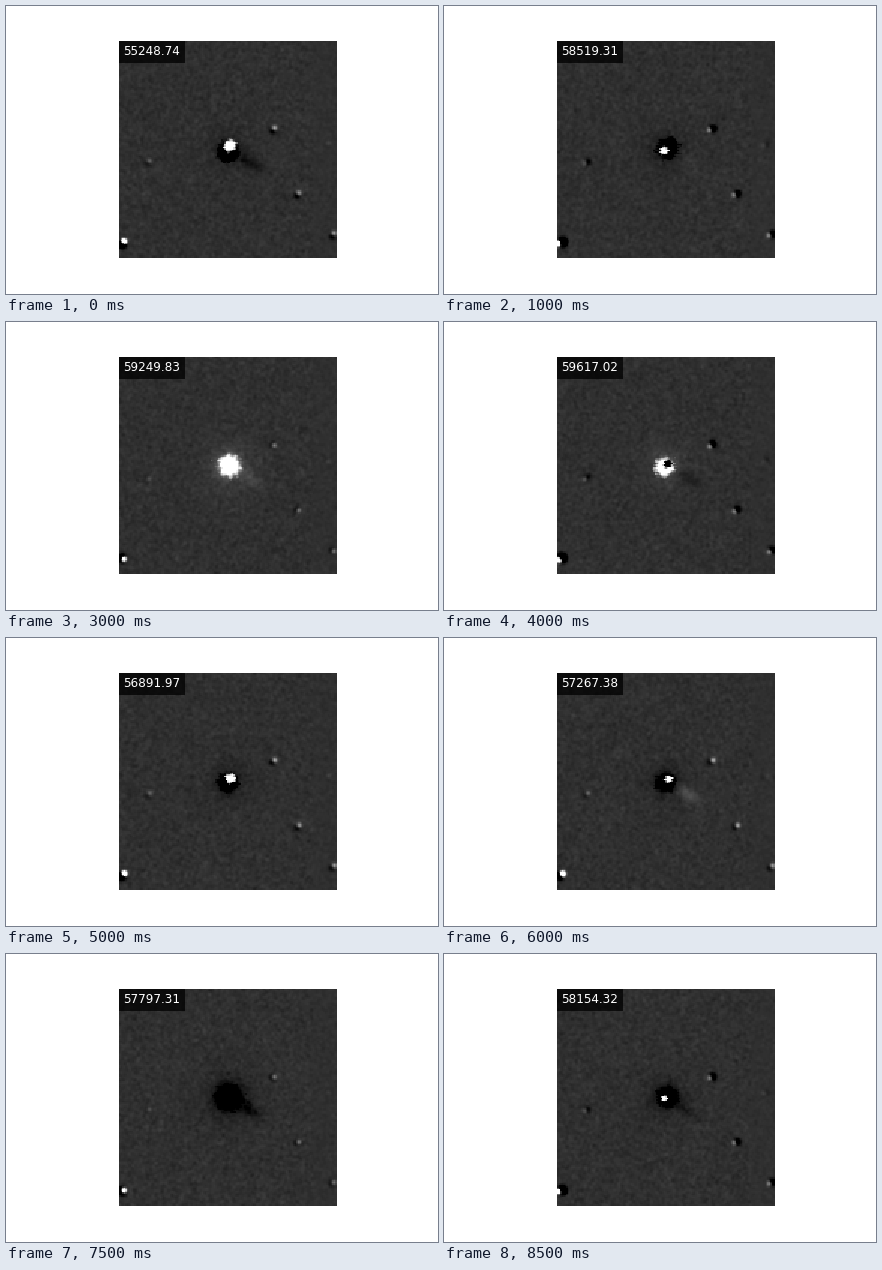
A matplotlib script for the animation above (9000 ms loop, 432x288 px).

```python
import numpy as np
import matplotlib.pyplot as plt
from matplotlib.animation import FuncAnimation
from matplotlib.patches import Rectangle

W, H, DPI = 432, 288, 72
LEFT, RIGHT, TOP, BOTTOM = 112.68, 330.12, 34.56, 252
N = 145
SKY = 0.187
FRAMES = 18

# key points along the light curve, in order of epoch
EPOCH = [0, 4, 7, 9, 13, 15, 17]
MJD = [55248.74, 57267.38, 57797.31, 58154.32, 58884.29, 59249.83, 59617.02]
WHITE = [6, 4, 0, 3, 5.5, 10.5, 9]      # radius of the bright core
BLACK = [10, 9.5, 12.5, 10, 9, 0, 4]    # radius of the dark core
SHIFT_X = [1.2, 2, .8, -2, -3, .8, -2]  # misalignment of the two images
SHIFT_Y = [-3, -2, -.5, 1, 1.5, .5, 2]
TAIL = [-.13, .13, -.12, -.06, .12, .08, -.08]

# x, y, gain of the field stars
STARS = [(267, 123.5, 1), (291.5, 188.5, .9), (326.5, 229, .9),
         (142, 156.5, .4), (321, 139, .15), (116.5, 237, 5)]

step = (RIGHT - LEFT) / N
X, Y = np.meshgrid(LEFT + (np.arange(N) + .5) * step,
                   TOP + (np.arange(N) + .5) * step)


def smooth_noise(rng):
    a = rng.normal(size=(N, N))
    for axis in (0, 1):
        a = (np.roll(a, 1, axis) + 2 * a + np.roll(a, -1, axis)) / 4
    return a / a.std()


def spot(x, y, r, power=2):
    return np.exp(-(np.hypot(X - x, Y - y) / r) ** power)


def stars(dx, dy):
    field = 0
    for x, y, gain in STARS:
        light = .6 * spot(x + .7 * dx, y + .4 * dy, 2.6)
        dark = (.4 - .08 * dx) * spot(x - .5 * dx, y - .4 * dy, 3.4)
        field = field + gain * (light - dark)
    return field


def tail(level):
    along = (X - 243) * .8 + (Y - 156) * .6
    across = (Y - 156) * .8 - (X - 243) * .6
    return level * np.exp(-(along / 13) ** 2 - (across / 6) ** 2)


def add_core(field, white, black, dx, dy, ragged):
    # the smaller disc lies on top; misaligned rows comb its edge
    discs = [(white, 1.2, 1), (black, -.3, -.6)]
    comb = .5 * dx * np.sin(2.1 * Y)
    for r, level, side in sorted(discs, reverse=True):
        dist = np.hypot(X - 222 - side * dx + comb, Y - 143.5 - side * dy)
        mask = np.exp(-(dist * ragged / max(r, .01)) ** 6)
        field = field * (1 - mask) + level * mask
    return field


def epoch_of(i):
    # the loop shows the first epoch, then enters the sequence halfway
    return 0 if i == 0 else 1 + (i + 8) % 17


def mjd(epoch):
    # the survey paused for four years after the first epoch
    return np.interp(epoch, [0, 1] + EPOCH[1:], [MJD[0], 56704.27] + MJD[1:])


def picture(i):
    rng = np.random.default_rng(40 + i)
    white, black, dx, dy, glow = (
        np.interp(epoch_of(i), EPOCH, row)
        for row in (WHITE, BLACK, SHIFT_X, SHIFT_Y, TAIL))
    calm = np.where(X > 306, .6, 1)
    field = SKY + .015 * smooth_noise(rng) * calm
    ragged = 1 + .1 * smooth_noise(rng)
    halo = .05 * (white - black) * spot(222, 144, 8, 1)
    field = field + halo * ragged ** 2 + tail(glow) * ragged + stars(dx, dy)
    return np.clip(add_core(field, white, black, dx, dy, ragged), 0, 1)


fig = plt.figure(figsize=(W / DPI, H / DPI), dpi=DPI, facecolor="white")
ax = fig.add_axes([LEFT / W, 1 - BOTTOM / H, (RIGHT - LEFT) / W, (BOTTOM - TOP) / H])
img = ax.imshow(picture(0), cmap="gray", vmin=0, vmax=1, aspect="auto",
                interpolation="nearest", extent=(LEFT, RIGHT, BOTTOM, TOP))
ax.axis("off")
ax.add_patch(Rectangle((LEFT, TOP), 66.5, 22.2, fc="black", ec="none", alpha=.75))
label = ax.text(LEFT + 4.8, 49.2, "", color="white", fontsize=12,
                family="DejaVu Sans", va="baseline")


def draw(i):
    img.set_data(picture(i))
    label.set_text(f"{mjd(epoch_of(i)):.2f}")
    return img, label


anim = FuncAnimation(fig, draw, frames=FRAMES, interval=500, repeat=True)
plt.show()
```
